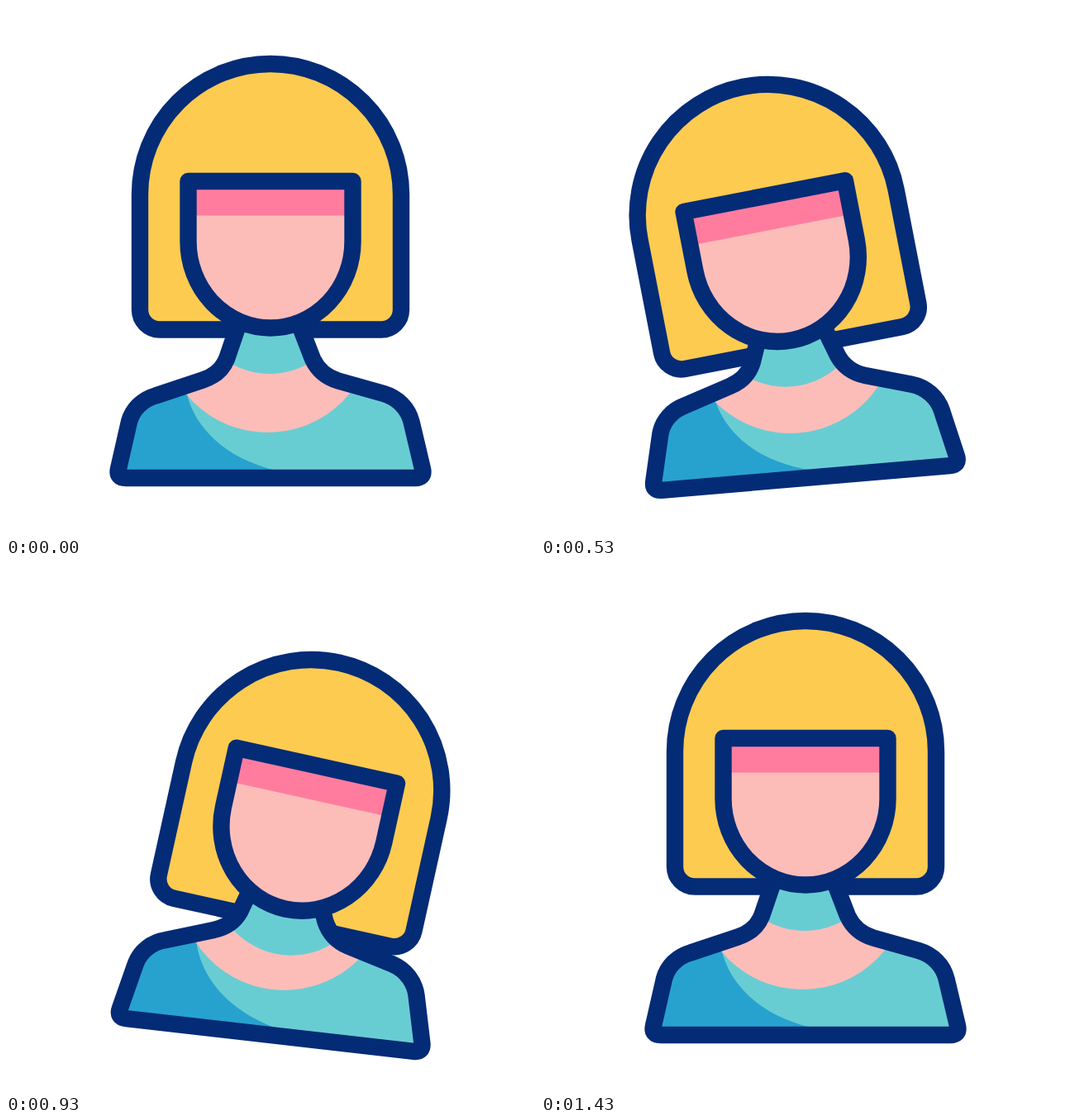
Recreate the animation shown at these times as an HTML page. Size 640 px wide and 640 px high, loop 2000 ms.

```html
<!DOCTYPE html>
<html lang="en">
<head>
<meta charset="utf-8">
<title>Nodding woman</title>
<style>
  html, body { margin: 0; width: 100%; height: 100%; overflow: hidden; background: #fff; }
  svg { display: block; width: 100vw; height: 100vh; }
  .line { stroke: #042b76; stroke-width: 20.4; stroke-linejoin: round; }
</style>
</head>
<body>
<svg viewBox="0 0 640 640">
  <defs>
    <path id="torso" d="M282 383 L267 427 C262 439 252 448 238 452.5 L181 471.5
      C165 476 153 488 149 503 L136 560 Q133.5 571 145 571 H495 Q506.5 571 504 560
      L490.5 503 C486.5 487 474 474 457 469 L402 453.5 C387 449 377 440 371 427 L354 383 Z"/>
    <path id="jaw" d="M220.5 212 H419.5 V285 A99.5 104.5 0 0 1 220.5 285 Z"/>
    <clipPath id="inside"><use href="#torso"/></clipPath>
  </defs>
  <g id="body">
    <path id="hair" class="line" fill="#fdcb50"
      d="M162 228 A158 158 0 0 1 478 228 V367.5 A24 24 0 0 1 454 391.5 H186 A24 24 0 0 1 162 367.5 Z"/>
    <g clip-path="url(#inside)">
      <use href="#torso" fill="#68cdd2"/>
      <path fill="#27a2cf" d="M219 470 C228 506 260 546 327 562 V575 H125 V455 Z"/>
      <circle cx="316.5" cy="388" r="128" fill="#fcbdb9"/>
      <circle id="collar" cx="319" cy="350" r="95" fill="#68cdd2"/>
    </g>
    <use href="#torso" class="line" fill="none"/>
    <g id="face">
      <use href="#jaw" fill="#fcbdb9"/>
      <rect x="220.5" y="212" width="199" height="41.5" fill="#ff7c9f"/>
      <use href="#jaw" class="line" fill="none"/>
    </g>
  </g>
</svg>
<script>
  const LOOP = 2000, STEP = 100 / 3;
  const LEFT = 470, RIGHT = 956, REST = 1378;
  const [body, hair, collar, face] =
    ['body', 'hair', 'collar', 'face'].map(id => document.getElementById(id));

  // Smooth rise from 0 to 1 between times a and b
  function ramp(t, a, b) {
    const u = Math.min(1, Math.max(0, (t - a) / (b - a)));
    return (1 - Math.cos(Math.PI * u)) / 2;
  }

  // Swing left, then right, then back upright (degrees)
  const sway = (t, start, left, right) =>
    -left * ramp(t, start, LEFT) + (left + right) * ramp(t, LEFT, RIGHT) - right * ramp(t, RIGHT, REST);

  // Two nods, one on each side, from 0 to 1
  const nod = t =>
    ramp(t, 0, 340) - ramp(t, 340, 680) + ramp(t, 680, 1045) - ramp(t, 1045, 1433);

  function draw(ms) {
    const t = Math.floor((ms % LOOP + 3.4) / STEP) * STEP;
    const lean = sway(t, 100, 5.35, 6.6);
    const turn = sway(t, 0, 12, 12.6) - lean;
    const head = drop => `rotate(${turn} 320 425) translate(0 ${drop * nod(t)})`;
    body.setAttribute('transform', `rotate(${lean} 320 565)`);
    hair.setAttribute('transform', head(54));
    face.setAttribute('transform', head(35.5));
    collar.setAttribute('transform', head(35.5));
  }

  const start = performance.now();
  function tick() {
    draw(performance.now() - start);
    requestAnimationFrame(tick);
  }
  tick();
</script>
</body>
</html>
```
